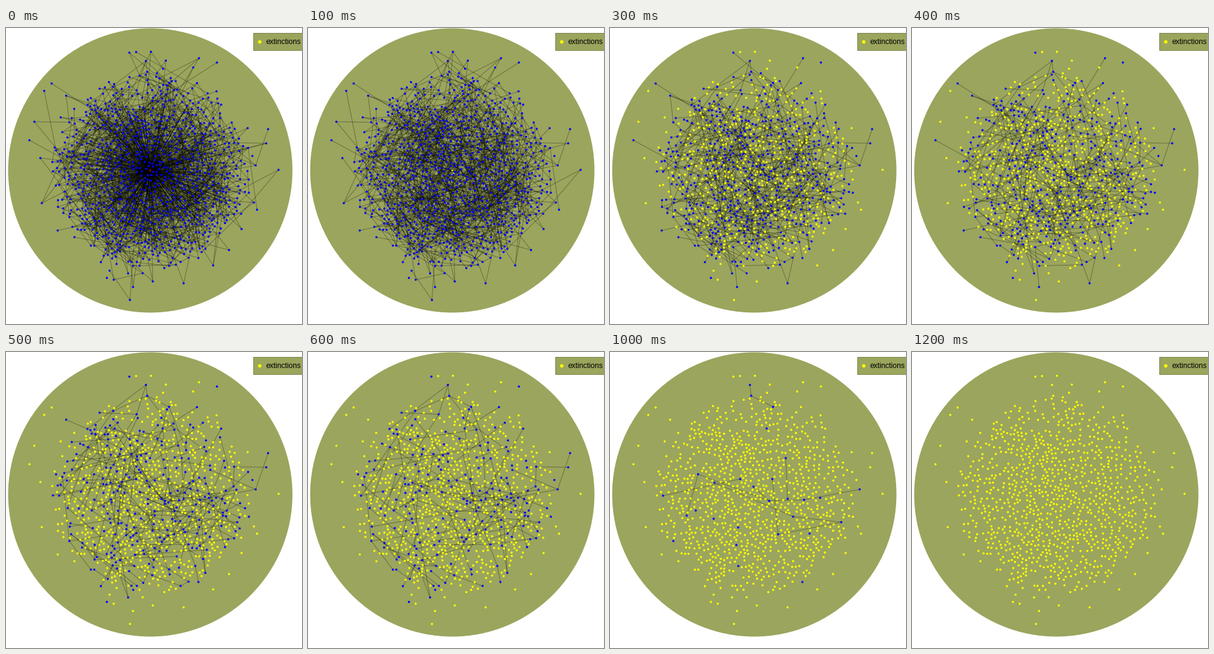
A matplotlib script that plays this animation: 480x480 px, repeating every 1300 ms.

```python
import numpy as np
import matplotlib.pyplot as plt
from matplotlib.animation import FuncAnimation
from matplotlib.collections import LineCollection
from matplotlib.patches import Circle, Rectangle

SIZE, DPI, FRAMES = 480, 100, 13
PX = 72 / DPI
HUB = (234, 231)
OLIVE = "#9ba55d"
TOTAL = 1000

# A few outlying nodes, grouped by the step at which they die out.
RIM = {
    2: [(238, 411)],
    3: [(211, 39), (62, 102), (46, 152), (58, 284), (201, 441), (336, 385),
        (382, 326), (402, 283), (442, 230)],
    5: [(313, 49), (74, 90), (38, 182), (206, 420), (288, 414)],
    7: [(200, 40), (342, 56), (198, 398), (425, 164)],
}

# Linked chains of long-lived nodes.
CHAINS = [
    [(229, 71), (273, 126), (285, 172), (288, 238)],
    [(174, 109), (227, 178)],
    [(145, 133), (157, 205), (139, 257), (170, 239), (241, 258), (213, 307)],
    [(86, 233), (211, 206)],
    [(254, 124), (273, 258), (307, 347), (312, 373)],
    [(334, 241), (297, 267), (375, 276)],
    [(370, 302), (296, 312), (205, 313)],
    [(165, 368), (173, 346), (208, 347), (237, 362)],
    [(369, 218), (370, 186), (422, 187)],
]

rng = np.random.default_rng(12)


def place_nodes():
    """Return the fixed nodes' death steps by position, hub first."""
    dies = {HUB: 1}
    for step, points in RIM.items():
        dies.update((p, step) for p in points)
    for chain in CHAINS:
        dies.update((p, int(rng.integers(9, 13))) for p in chain)
    return dies


def scatter_nodes(pts, count, inner, outer, gap, falloff):
    """Add random nodes in a ring, thinning outward, with minimum spacing."""
    goal = len(pts) + count
    while len(pts) < goal:
        p = rng.uniform(-outer, outer, 2)
        r = np.hypot(*p)
        if not inner <= r <= outer or rng.random() > falloff(r):
            continue
        p += HUB
        if np.hypot(*(pts - p).T).min() > gap:
            pts = np.vstack([pts, p])
    return pts


def link_nodes(pts, death, index):
    """Join each node to nearby ones that live at least as long."""
    pairs = [(index[a], index[b]) for chain in CHAINS
             for a, b in zip(chain, chain[1:])]
    done = {i for pair in pairs for i in pair}
    radius = np.hypot(*(pts - HUB).T)
    order = 1 + np.argsort(-death[1:], kind="stable")
    for rank, i in enumerate(order):
        if i in done or rank == 0:
            continue
        tries = 8 if radius[i] > 155 else 3
        for _ in range(int(0.5 + 1.4 * rank / TOTAL + rng.random())):
            pool = rng.choice(order[:rank], tries)
            gap = np.hypot(*(pts[pool] - pts[i]).T)
            pairs.append((i, pool[gap.argmin()]))
    chance = np.clip(1.2 - radius / 170, 0, 1)
    pairs += [(0, i) for i in range(1, TOTAL) if rng.random() < chance[i]]
    return np.array(pairs)


dies = place_nodes()
index = {p: i for i, p in enumerate(dies)}
pts = np.array(list(dies), float)
pts = scatter_nodes(pts, 36, 158, 195, 11, lambda r: ((200 - r) / 42) ** 2)
pts = scatter_nodes(pts, TOTAL - len(pts), 0, 158, 4.8,
                    lambda r: np.exp(-(r / 140) ** 2))

# Each step wipes out about 28% of the surviving nodes.
steps = np.arange(2, FRAMES)
shares = 0.72 ** steps
extra = rng.choice(steps, TOTAL - len(dies), p=shares / shares.sum())
death = np.concatenate([list(dies.values()), extra])
pairs = link_nodes(pts, death, index)
lines = pts[pairs]
line_end = death[pairs].min(axis=1)

fig = plt.figure(figsize=(SIZE / DPI, SIZE / DPI), dpi=DPI, facecolor="white")
ax = fig.add_axes([0, 0, 1, 1])
ax.set(xlim=(0, SIZE), ylim=(SIZE, 0))
ax.axis("off")

ax.add_patch(Circle(HUB, 230.5, fc=OLIVE, ec="none"))
links = LineCollection([], colors=[(0, 0, 0, 0.32)], linewidths=PX, zorder=2)
ax.add_collection(links)
sizes = np.full(TOTAL, (3.5 * PX) ** 2)
sizes[0] = (2.8 * PX) ** 2
dots = ax.scatter(*pts.T, s=sizes, linewidths=0, zorder=3)

ax.add_patch(Rectangle((400.5, 7.5), 82, 28.5, fc=OLIVE, ec="#7d854b",
                       lw=PX, zorder=4))
ax.scatter([410.5], [21.5], s=(5.6 * PX) ** 2, c="yellow", linewidths=0,
           zorder=5)
ax.text(421, 26, "extinctions", family="Liberation Sans", size=12 * PX,
        color="black", va="baseline", zorder=5)

BLUE, YELLOW = (0, 0, 1), (1, 1, 0)


def draw(step):
    colors = np.where((death > step)[:, None], BLUE, YELLOW).astype(float)
    if step == 0:
        colors[0] = (1, 0, 0)
    dots.set_facecolors(colors)
    links.set_segments(lines[line_end > step])
    return links, dots


anim = FuncAnimation(fig, draw, frames=FRAMES, interval=100, repeat=True,
                     repeat_delay=0)
plt.show()
```
